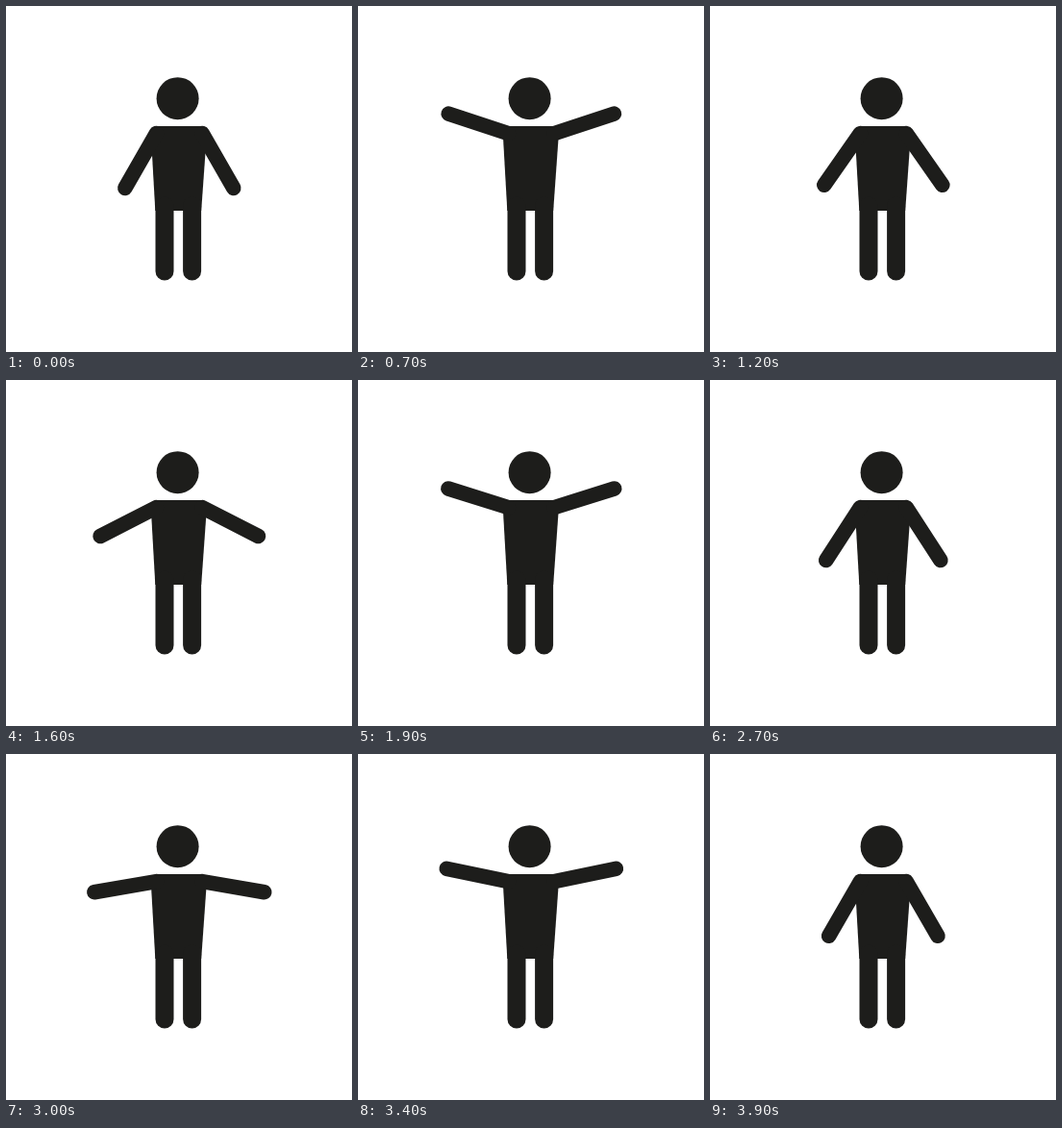
An HTML page with a canvas that plays this animation: 360 px wide and 360 px high, repeating every 4000 ms.

```html
<!DOCTYPE html>
<html lang="en">
<head>
<meta charset="utf-8">
<title>Arm raises</title>
<style>
  html, body { margin: 0; width: 100%; height: 100%; overflow: hidden; background: #fff; }
  canvas { display: block; }
</style>
</head>
<body>
<canvas id="stage" width="360" height="360"></canvas>
<script>
const ctx = document.getElementById('stage').getContext('2d');

const LOOP = 4000, STEP = 100, SWING = 1308;
const LOW = 29.8, HIGH = 109.2;   // arm angle from straight down, in degrees
const ARM = 65.5, ARM_WIDTH = 15.6, LEG_WIDTH = 19;
const SHOULDER_Y = 132.6;

function limb(x1, y1, x2, y2, width) {
  ctx.lineWidth = width;
  ctx.beginPath();
  ctx.moveTo(x1, y1);
  ctx.lineTo(x2, y2);
  ctx.stroke();
}

function arm(x, side, angle) {
  limb(x, SHOULDER_Y, x + side * ARM * Math.sin(angle), SHOULDER_Y + ARM * Math.cos(angle), ARM_WIDTH);
}

function polygon(points) {
  ctx.beginPath();
  points.forEach(([x, y]) => ctx.lineTo(x, y));
  ctx.fill();
}

function draw(time) {
  const lift = (1 - Math.cos(2 * Math.PI * time / SWING)) / 2;
  const angle = (LOW + (HIGH - LOW) * lift) * Math.PI / 180;

  ctx.fillStyle = '#fff';
  ctx.fillRect(0, 0, 360, 360);
  ctx.fillStyle = ctx.strokeStyle = '#1d1d1b';
  ctx.lineCap = 'round';

  ctx.beginPath();
  ctx.arc(178.6, 96.2, 22, 0, 2 * Math.PI);
  ctx.fill();

  polygon([[156.4, 124.9], [204.2, 124.9], [208.6, 137], [203.2, 213], [155.3, 213], [151, 137]]);
  limb(165, 208, 165, 276, LEG_WIDTH);
  limb(193.6, 208, 193.6, 276, LEG_WIDTH);

  arm(156.4, -1, angle);
  arm(204.2, 1, angle);
}

const start = performance.now();
function tick() {
  const time = (performance.now() - start) % LOOP;
  draw(Math.floor(time / STEP) * STEP);
  requestAnimationFrame(tick);
}
tick();
</script>
</body>
</html>
```
